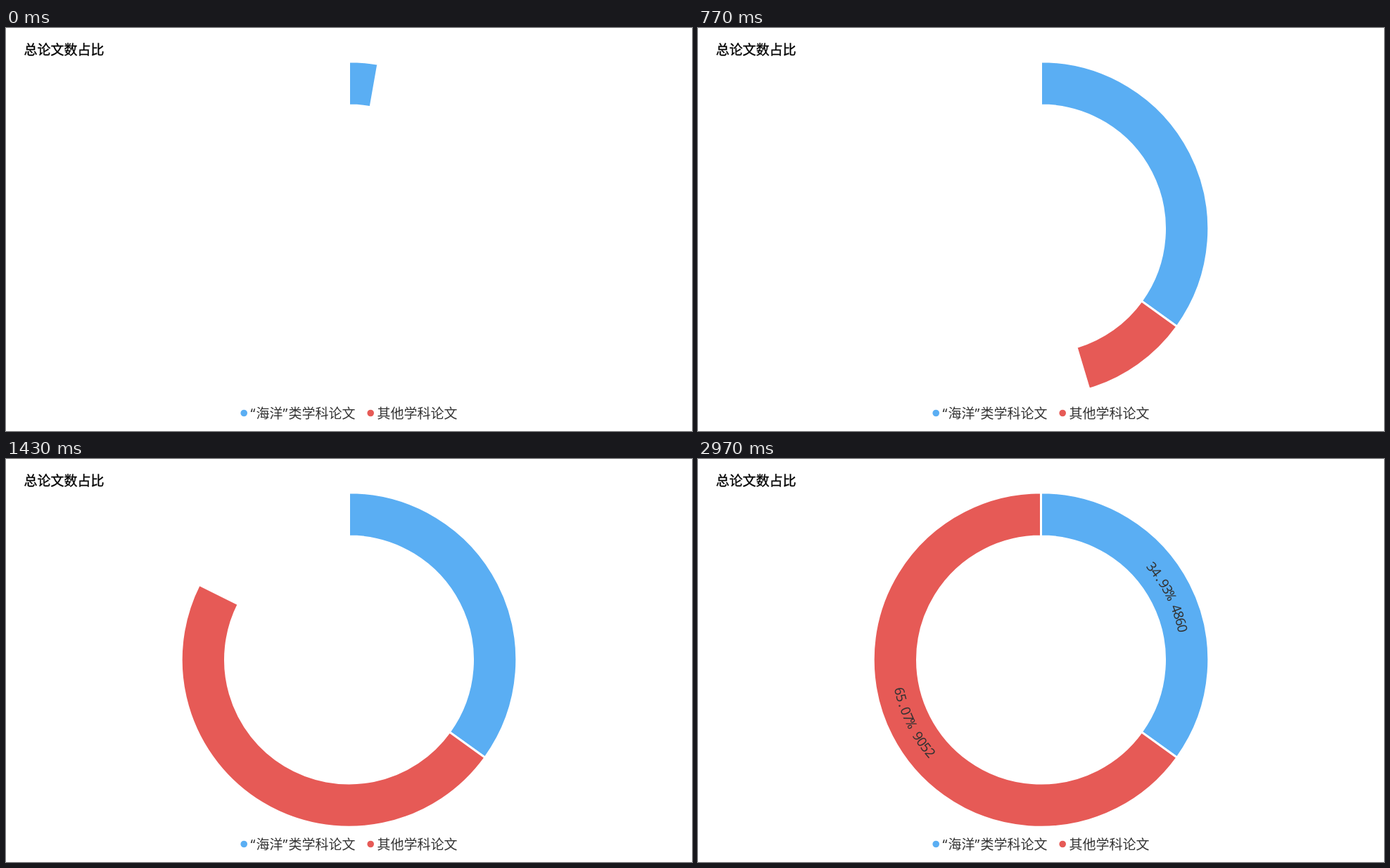
These frames come from a looping animation (975x574 px, 3.01 s). An HTML page:

```html
<!DOCTYPE html>
<html lang="zh-CN">
<head>
<meta charset="utf-8">
<style>
  html, body { margin: 0; width: 100%; height: 100%; overflow: hidden; background: #fff; }
  svg { display: block; }
  text { font: 19px "Noto Sans", "Noto Sans CJK SC", sans-serif; fill: #333; }
  .title { font-weight: 500; fill: #000; stroke: #000; stroke-width: 0.35; }
  .percent { font-family: "Noto Sans Mono", monospace; }
  #labels text { text-anchor: middle; }
  path { stroke: #fff; stroke-width: 3; }
  .ocean { fill: #5aaef3; }
  .other { fill: #e65a56; }
</style>
</head>
<body>
<svg width="975" height="574" viewBox="0 0 975 574">
  <text class="title" x="25.5" y="38">总论文数占比</text>
  <g transform="translate(487.5 286)">
    <path id="ocean" class="ocean"/>
    <path id="other" class="other"/>
    <g id="labels"></g>
  </g>
  <circle class="ocean" cx="338.2" cy="548.5" r="4.8"/>
  <text x="347.6" y="555.5">“<tspan x="355.5">海洋</tspan>”<tspan x="401.5">类学科论文</tspan></text>
  <circle class="other" cx="518.2" cy="548.5" r="4.8"/>
  <text x="527.4" y="555.5">其他学科论文</text>
</svg>
<script>
const LOOP = 3010, FRAME = 100 / 3;
const OUTER = 238.3, INNER = 176, SPLIT = 360 * 4860 / (4860 + 9052);
const byId = id => document.getElementById(id);
const labels = byId('labels');

// Angles are in degrees, clockwise from the top.
function point(r, deg) {
  const a = deg * Math.PI / 180;
  return `${r * Math.sin(a)} ${-r * Math.cos(a)}`;
}

function sector(from, to) {
  if (to <= from) return '';
  const large = to - from > 180 ? 1 : 0;
  return `M${point(OUTER, from)}A${OUTER} ${OUTER} 0 ${large} 1 ${point(OUTER, to)}` +
    `L${point(INNER, to)}A${INNER} ${INNER} 0 ${large} 0 ${point(INNER, from)}Z`;
}

// Sets each character upright on the ring; the left half reads counterclockwise.
function curvedLabel(str, middle, flip) {
  [...str].forEach((ch, i) => {
    const offset = (i - (str.length - 1) / 2) * 2.76;
    const angle = flip ? middle - 180 - offset : middle + offset;
    const el = document.createElementNS('http://www.w3.org/2000/svg', 'text');
    el.textContent = ch;
    el.setAttribute('y', flip ? 212.5 : -199);
    el.setAttribute('transform', `rotate(${angle})`);
    if (ch === '%') el.setAttribute('class', 'percent');
    labels.append(el);
  });
}

curvedLabel('34.93% 4860', SPLIT / 2 + 0.8, false);
curvedLabel('65.07% 9052', SPLIT / 2 + 180 + 0.8, true);

function draw(now) {
  const frame = Math.floor((now % LOOP + 5) / FRAME);
  const time = frame * FRAME;
  const sweep = Math.min(360, 10 + time * 0.2);
  byId('ocean').setAttribute('d', sector(0, Math.min(sweep, SPLIT)));
  byId('other').setAttribute('d', sector(SPLIT, sweep));
  const fade = Math.max(0, time - 1950) / 175;
  labels.setAttribute('opacity', 1 - Math.exp(-fade * fade));
}

const start = performance.now();
function tick() {
  draw(performance.now() - start);
  requestAnimationFrame(tick);
}
tick();
</script>
</body>
</html>
```
